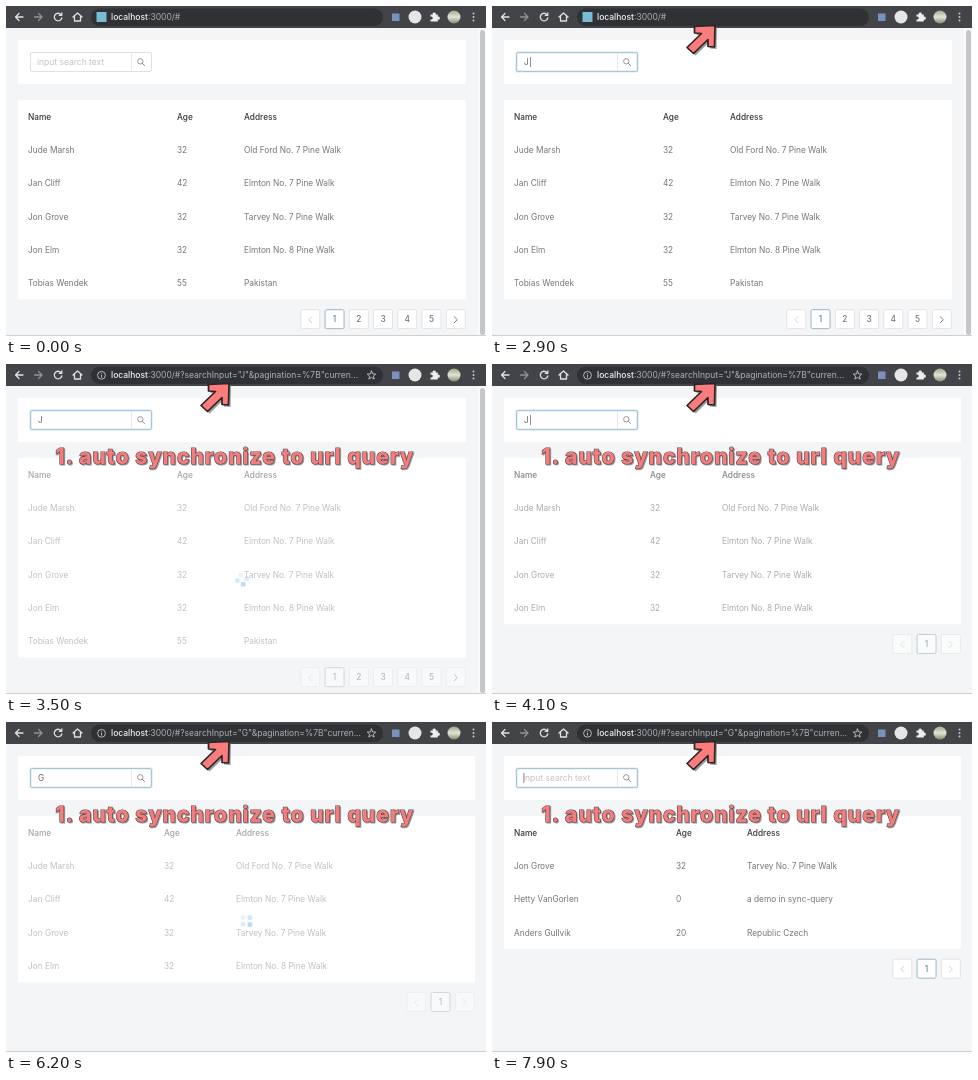
An HTML page for the animation above (8000 ms loop, 480 by 330 pixels).

```html
<!DOCTYPE html>
<html lang="en">
<head>
<meta charset="utf-8">
<title>Search table</title>
<style>
  html, body { margin: 0; width: 100%; height: 100%; overflow: hidden; background: #f4f5f7; }
  svg { display: block; width: 480px; height: 330px; font: 8.3px Inter, "Open Sans", sans-serif; }
  .line { fill: none; stroke-width: 1.3; stroke-linecap: round; stroke-linejoin: round; }
  .title { font-size: 21px; font-weight: 800; letter-spacing: 1.05px; fill: #f47c7c; stroke: #5a4a4c;
    stroke-width: 1.2px; paint-order: stroke; filter: drop-shadow(1.5px 1.5px 0 #9a9a9c); }
</style>
</head>
<body>
<svg id="stage" viewBox="0 0 480 330"></svg>
<script>
const LOOP = 8000;
const stage = document.getElementById('stage');

const people = {
  jude: ['Jude Marsh', 32, 'Old Ford No. 7 Pine Walk'],
  jan: ['Jan Cliff', 42, 'Elmton No. 7 Pine Walk'],
  grove: ['Jon Grove', 32, 'Tarvey No. 7 Pine Walk'],
  elm: ['Jon Elm', 32, 'Elmton No. 8 Pine Walk'],
  tobias: ['Tobias Wendek', 55, 'Pakistan'],
  hetty: ['Hetty VanGorlen', 0, 'a demo in sync-query'],
  anders: ['Anders Gullvik', 20, 'Republic Czech']
};
const pick = (...keys) => keys.map(k => people[k]);

// Table contents, column positions, right edge and page count, by start time
const views = [
  { at: 0, rows: pick('jude', 'jan', 'grove', 'elm', 'tobias'), cols: [22, 171, 238], right: 460, pages: 5 },
  { at: 4000, rows: pick('jude', 'jan', 'grove', 'elm'), cols: [22, 158, 230], right: 469, pages: 1 },
  { at: 6680, rows: pick('grove', 'hetty', 'anders'), cols: [22, 184, 255], right: 469, pages: 1 }
];
const inputs = [
  { at: 0, text: '' }, { at: 1700, text: '' }, { at: 2700, text: 'J' },
  { at: 4500, text: '' }, { at: 5500, text: 'G' }, { at: 7600, text: '' }
];
const loads = [[3100, 4000], [5900, 6680]];

const clamp = v => Math.max(0, Math.min(1, v));
const ramp = (t, from, len) => clamp((t - from) / len);
const latest = (list, t) => list.filter(s => s.at <= t).pop();

const rect = (x, y, w, h, fill, more = '') =>
  `<rect x="${x}" y="${y}" width="${w}" height="${h}" fill="${fill}" ${more}/>`;
const circle = (x, y, r, fill, more = '') => `<circle cx="${x}" cy="${y}" r="${r}" fill="${fill}" ${more}/>`;
const line = (d, color, more = '') => `<path class="line" d="${d}" stroke="${color}" ${more}/>`;
const text = (x, y, str, fill, more = '') => `<text x="${x}" y="${y}" fill="${fill}" ${more}>${str}</text>`;

function toolbar(t) {
  const query = t >= 5900 ? 'G' : t >= 3100 ? 'J' : '';
  const path = query && `?searchInput="${query}"&amp;pagination=%7B"curren...`;
  let s = rect(0, 0, 480, 22, '#434448') + rect(85, 2.5, 292, 17.5, '#303135', 'rx="8.7"');
  s += line('M17 11H9.5M13 7.5L9.5 11L13 14.5', '#dfe1e5');
  s += line('M28.5 11H36M32.5 7.5L36 11L32.5 14.5', '#8f9195');
  s += line('M55 8.6A3.8 3.8 0 1 0 55.8 12M55.8 6.8V9.3H53.2', '#dfe1e5');
  s += line('M67 11L71.5 7L76 11M68.5 10.3V15H74.5V10.3', '#dfe1e5');
  if (query) {
    s += circle(95.5, 11.3, 3.9, 'none', 'stroke="#b5b8bd"') + line('M95.5 11V13.2M95.5 9.3V9.4', '#b5b8bd', 'style="stroke-width:1"');
    s += line('M365.5 7L366.7 9.9L369.8 10.1L367.4 12.1L368.2 15.1L365.5 13.4L362.8 15.1L363.6 12.1L361.2 10.1L364.3 9.9Z',
      '#c4c6ca', 'style="stroke-width:.9"');
  } else {
    s += rect(90.5, 6, 10, 10, '#78bcd3');
  }
  s += text(105, 14.2, `<tspan fill="#f1f3f4" font-weight="500">localhost</tspan>:3000/#${path}`, '#adb0b5', 'font-size="8.5"');
  s += rect(386, 7.5, 7.5, 7.5, '#7891c0') + circle(409, 11, 6.5, '#e6e6e6');
  s += `<path d="M424.5 8.5h2.3a1.5 1.5 0 1 1 2.8 0h2.2v2.3a1.5 1.5 0 1 1 0 2.8v2h-7.3v-2.2a1.5 1.5 0 1 0 0-2.6z" fill="#eceef0"/>`;
  s += circle(448, 11, 6.5, 'url(#avatar)');
  for (const y of [7.5, 11, 14.5]) s += circle(467.5, y, 1, '#c6c8cb');
  return s;
}

function search(t, right) {
  const field = latest(inputs, t), focus = ramp(t, 1700, 200);
  let s = rect(12, 34, right - 12, 44, '#fff');
  s += rect(24.5, 46.5, 121, 19, '#fff', 'rx="1.5" stroke="#e0e0e2"');
  s += line('M125.5 47V65.5', '#e8e8ea', 'style="stroke-width:1"');
  s += `<g opacity="${focus}">` + rect(24.5, 46.5, 121, 19, 'none', 'rx="1.5" stroke="#e3eff5" stroke-width="2.6"')
    + rect(24.5, 46.5, 121, 19, 'none', 'rx="1.5" stroke="#a6c6d6"') + '</g>';
  s += circle(134.3, 55.3, 2.7, 'none', 'stroke="#8c8c8c" stroke-width=".9"') + line('M136.4 57.4L138.6 59.6', '#8c8c8c', 'style="stroke-width:1"');
  s += field.text ? text(32, 59, field.text, '#666') : text(31, 59, 'input search text', '#c2c2c4', 'font-size="8.5"');
  if (field.at && (t - field.at) % 1000 < 500) s += rect(field.text ? 38 : 31.5, 51, 0.8, 10, '#777');
  return s;
}

function pager(view, y) {
  const step = 24.25, count = view.pages + 2;
  let s = '';
  for (let i = 0; i < count; i++) {
    const x = view.right - 10.2 - (count - 1 - i) * step, active = i === 1;
    s += rect(x - 9.5, y - 9.5, 19, 19, '#fff', `rx="1.5" stroke="${active ? '#9ab5c6' : '#e3e3e6'}"`);
    if (i === 0) s += line(`M${x + 1.5} ${y - 2.5}l-3 3l3 3`, '#cfcfcf', 'style="stroke-width:.9"');
    else if (i === count - 1)
      s += line(`M${x - 1.5} ${y - 2.5}l3 3l-3 3`, view.pages > 1 ? '#777' : '#cfcfcf', 'style="stroke-width:.9"');
    else s += text(x, y + 3, i, active ? '#6b8596' : '#777', 'text-anchor="middle" font-weight="500"');
  }
  return s;
}

function table(t, view) {
  const rowH = 33.25, height = rowH * (view.rows.length + 1), pagerY = 94 + height + 19.7;
  const dim = Math.max(0, ...loads.map(([from, to]) => ramp(t, from, 300) * (1 - ramp(t, to, 350))));
  const cells = (row, i, fill, more) =>
    row.map((cell, c) => text(view.cols[c], 113.8 + i * rowH, cell, fill, more)).join('');
  let s = rect(12, 94, view.right - 12, height, '#fff') + `<g opacity="${1 - dim * 0.55}">`;
  s += cells(['Name', 'Age', 'Address'], 0, '#383838', 'font-weight="500"');
  view.rows.forEach((row, i) => s += cells(row, i + 1, '#757575'));
  s += pager(view, pagerY) + '</g>';

  const load = loads.find(([from, to]) => t >= from && t < to);
  return load ? s + spinner(t - load[0], (12 + view.right) / 2, (94 + pagerY + 20) / 2 + 2) : s;
}

function spinner(t, x, y) {
  let s = `<g opacity="${0.45 * ramp(t, 0, 300)}">`;
  for (let i = 0; i < 4; i++) {
    const a = Math.PI * (0.25 + i / 2 + t / 600);
    const glow = 0.65 - 0.35 * Math.cos(Math.PI * (t / 1000 - i * 0.4));
    s += circle(x + 4.8 * Math.cos(a), y + 4.8 * Math.sin(a), 2.5, '#63abe2', `opacity="${glow}"`);
  }
  return s + '</g>';
}

function notes(t) {
  const arrow = 'M202.5 20.5L223 19.5L222.5 41L216 40.5V33.5L201.5 47.5L195 41.5L209.5 27.5L202.5 27Z';
  return `<g opacity="${ramp(t, 2200, 300)}" stroke-linejoin="round">
    <path d="${arrow}" transform="translate(2 2)" fill="#9a9a9c"/>
    <path d="${arrow}" fill="#fb7c7c" stroke="#2c2526" stroke-width="1.7"/></g>`
    + `<g opacity="${ramp(t, 2950, 250)}"><text class="title" x="49.5" y="100">1. auto synchronize to url query</text></g>`;
}

function draw(now) {
  const t = now % LOOP, view = latest(views, t);
  let s = `<defs><linearGradient id="avatar" x2="0" y2="1"><stop stop-color="#9cab88"/>
    <stop offset=".5" stop-color="#e4e2d8"/><stop offset="1" stop-color="#82906c"/></linearGradient></defs>`;
  s += rect(0, 0, 480, 330, '#f4f5f7') + search(t, view.right) + table(t, view);
  if (view.pages > 1) s += rect(472, 22, 8, 308, '#fafafa') + rect(474, 24, 5, 305, '#c5c6c9', 'rx="2.5"');
  s += rect(0, 329, 480, 1, '#cfd0d3') + toolbar(t) + notes(t);
  stage.innerHTML = s;
  requestAnimationFrame(() => draw(performance.now() - start));
}
const start = performance.now();
draw(0);
</script>
</body>
</html>
```
